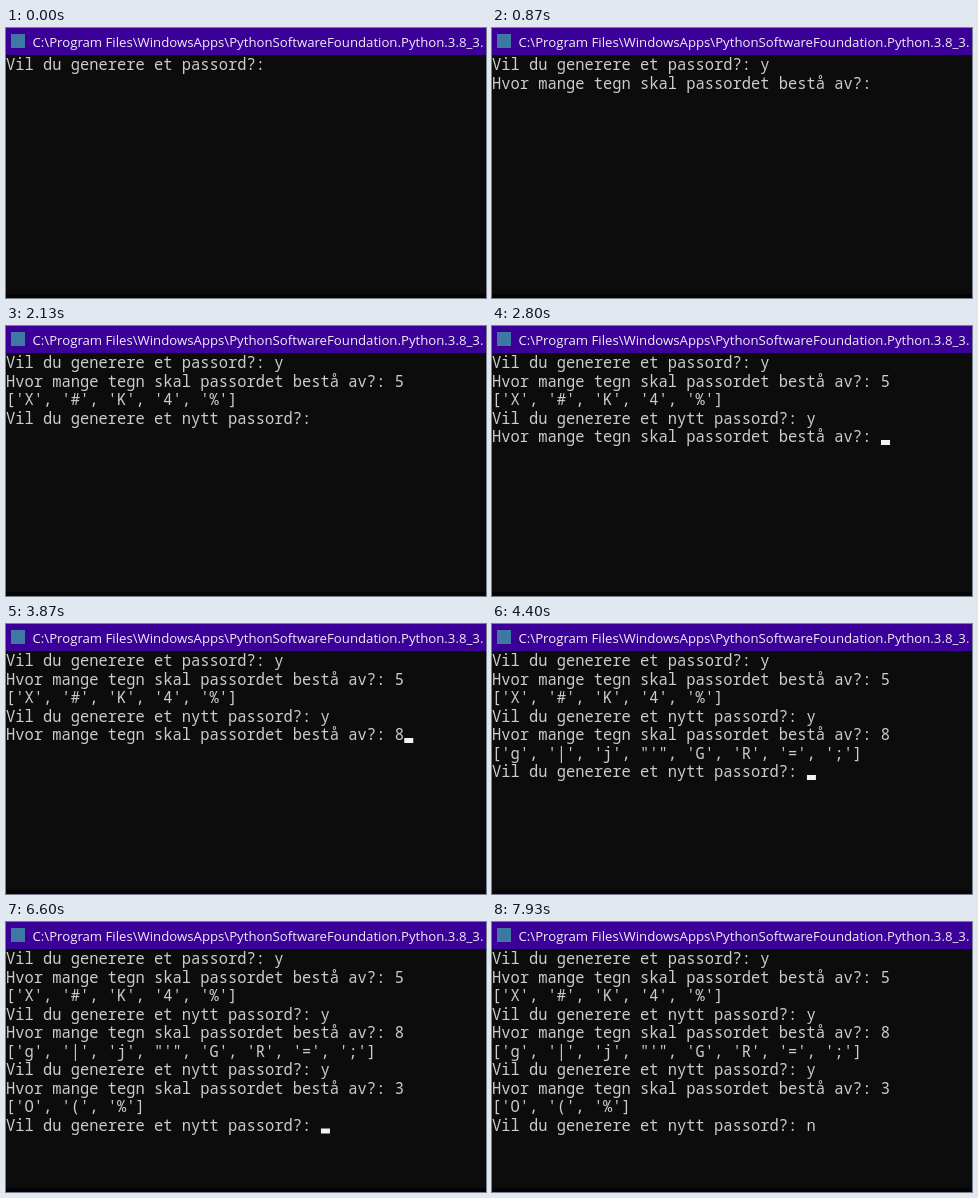
Write an HTML page that moves like this. It is 480 by 270 pixels and loops after 8 s.

```html
<!DOCTYPE html>
<html lang="no">
<head>
<meta charset="utf-8">
<title>Passordgenerator</title>
<style>
  html, body { margin: 0; width: 100%; height: 100%; overflow: hidden; background: #0c0c0c; }
  svg { display: block; width: 480px; height: 270px; }
  text { white-space: pre; }
  .title { font: 13.2px "Open Sans", "Noto Sans", sans-serif; fill: #f0edf6; }
  .console { font: 15.43px "Noto Sans Mono", "DejaVu Sans Mono", monospace; fill: #cccccc; }
</style>
</head>
<body>
<svg viewBox="0 0 480 270" xmlns="http://www.w3.org/2000/svg">
  <rect width="480" height="270" fill="#0c0c0c"/>
  <rect y="266" width="480" height="4" fill="#040404"/>
  <rect width="480" height="27" fill="#3b0097"/>
  <rect x="5" y="6" width="14" height="14" fill="#3f78a5"/>
  <text class="title" x="26.5" y="18.5">C:\Program Files\WindowsApps\PythonSoftwareFoundation.Python.3.8_3.</text>
  <g id="console" class="console"></g>
  <rect id="cursor" width="9" height="5" fill="#f2f2f2"/>
</svg>
<script>
const LOOP = 8000;
const COL = 9.257, ROW = 18.5, BASE = 42;

const ASK_LENGTH = "Hvor mange tegn skal passordet bestå av?: ";
const ASK_AGAIN = "Vil du generere et nytt passord?: ";

// Console output: [time, appended text]
const output = [
  [0, "Vil du generere et passord?: "],
  [70, "y"],
  [330, "\n" + ASK_LENGTH],
  [1070, "5"],
  [1400, "\n"],
  [1600, "['X', '#', 'K', '4', '%']\n" + ASK_AGAIN],
  [2330, "y"],
  [2600, "\n" + ASK_LENGTH],
  [3870, "8"],
  [4130, "\n"],
  [4330, "['g', '|', 'j', \"'\", 'G', 'R', '=', ';']\n" + ASK_AGAIN],
  [4800, "y"],
  [5870, "\n" + ASK_LENGTH],
  [6130, "3"],
  [6330, "\n"],
  [6530, "['O', '(', '%']\n" + ASK_AGAIN],
  [7000, "n"],
  [7330, "\n"]
];

// Spans in which the blinking cursor is hidden
const hidden = [[0, 70], [870, 1070], [2000, 2330], [3000, 3530], [5130, 5670], [7800, LOOP]];

const consoleGroup = document.getElementById("console");
const cursor = document.getElementById("cursor");

const rows = Array.from({ length: 11 }, (_, i) => {
  const row = document.createElementNS("http://www.w3.org/2000/svg", "text");
  row.setAttribute("x", 0);
  row.setAttribute("y", BASE + i * ROW);
  consoleGroup.append(row);
  return row;
});

function draw(t) {
  const lines = output.filter(([at]) => at <= t).map(([, text]) => text).join("").split("\n");
  rows.forEach((row, i) => {
    const text = lines[i] || "";
    if (row.textContent !== text) row.textContent = text;
  });
  const last = lines.length - 1;
  cursor.setAttribute("x", lines[last].length * COL + 0.2);
  cursor.setAttribute("y", BASE + last * ROW - 2);
  const off = hidden.some(([from, to]) => t >= from && t < to);
  cursor.setAttribute("visibility", off ? "hidden" : "visible");
}

const start = performance.now();
function tick() {
  draw((performance.now() - start) % LOOP);
  requestAnimationFrame(tick);
}
tick();
</script>
</body>
</html>
```
